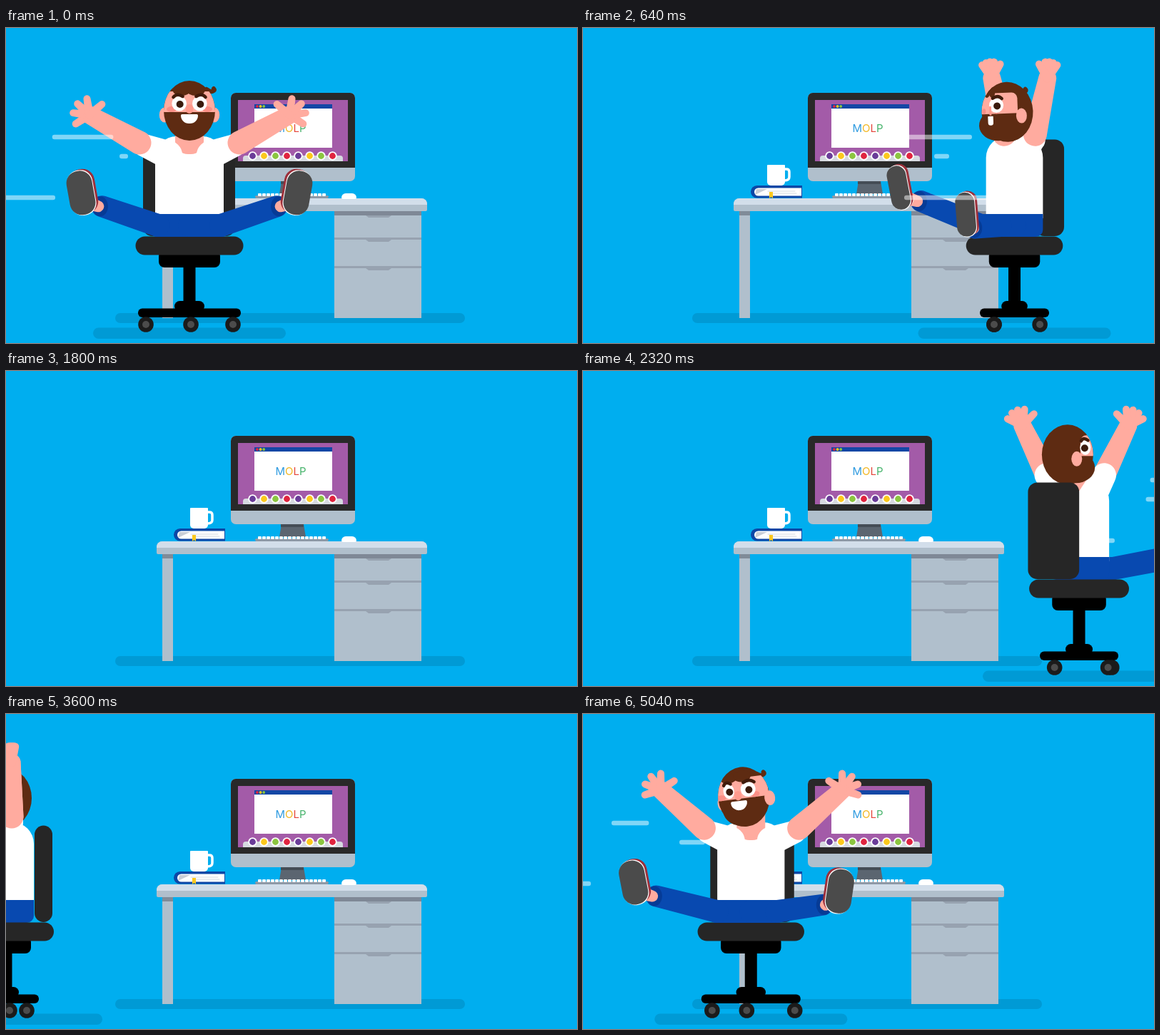
Write an HTML page with a canvas that moves like this. It is 800x442 px and loops after 5.08 s.

```html
<!DOCTYPE html>
<html lang="en">
<head>
<meta charset="utf-8">
<title>Office chair spin</title>
<style>
html, body { margin: 0; width: 100%; height: 100%; overflow: hidden; background: #00aeef; }
canvas { display: block; }
</style>
</head>
<body>
<canvas id="stage" width="800" height="442"></canvas>
<script>
const ctx = document.getElementById('stage').getContext('2d');
const LOOP = 5080, STEP = 40, RAD = Math.PI / 180;
const SKIN = '#ffab9f', HAIR = '#5e2b12', JEANS = '#0849b0', CUFF = '#063b96', CHAIR = '#262626',
      RED = '#9c303b', SHADOW = 'rgba(0,40,60,.15)', STEEL = '#b0bfcc', LINE = '#97a2b0',
      PURPLE = '#6a3c98', YELLOW = '#fbc81d', GREEN = '#8bc540', CRIMSON = '#e0243f';

function box(x, y, w, h, r, color) {
  ctx.fillStyle = color;
  ctx.beginPath();
  ctx.roundRect(x, y, w, h, r);
  ctx.fill();
}
function disc(x, y, rx, color, ry = rx) {
  ctx.fillStyle = color;
  ctx.beginPath();
  ctx.ellipse(x, y, rx, ry, 0, 0, 7);
  ctx.fill();
}
function shape(color, ...points) {
  ctx.fillStyle = color;
  ctx.beginPath();
  points.forEach(p => ctx.lineTo(...p));
  ctx.fill();
}
function line(color, width, path) {
  ctx.strokeStyle = color;
  ctx.lineWidth = width;
  ctx.lineCap = ctx.lineJoin = 'round';
  ctx.stroke(new Path2D(path));
}
// Tapered capsule between two circles
function limb(x1, y1, r1, x2, y2, r2, color) {
  const a = Math.atan2(y2 - y1, x2 - x1), q = Math.PI / 2;
  ctx.fillStyle = color;
  ctx.beginPath();
  ctx.arc(x1, y1, r1, a + q, a - q);
  ctx.arc(x2, y2, r2, a - q, a + q);
  ctx.fill();
}

function drawDesk() {
  box(153, 400, 490, 14, 7, SHADOW);
  box(219, 257, 15, 150, 0, STEEL);
  box(219, 257, 15, 6, 0, '#808b98');
  box(460, 257, 122, 150, 0, STEEL);
  box(460, 257, 122, 6, 0, '#7f8896');
  for (const y of [263, 297, 337]) {
    if (y > 263) box(460, y - 3, 122, 3, 0, LINE);
    shape(LINE, [504, y], [540, y], [536, y + 3], [508, y + 3]);
  }
  box(211, 239, 379, 18, [8, 8, 2, 2], STEEL);
  box(211, 239, 379, 9, [8, 8, 0, 0], '#d2deea');

  shape('#5b6570', [386, 215], [417, 215], [420, 233], [383, 233]);
  box(385, 215, 32, 4, 0, '#454d56');
  box(315, 91, 174, 124, 7, STEEL);
  box(315, 91, 174, 105, [7, 7, 0, 0], '#292929');
  box(325, 101, 154, 86, 0, '#a35ba8');
  box(348, 107, 109, 61, 0, '#fff');
  box(348, 107, 109, 6, 0, '#1347a5');
  [CRIMSON, YELLOW, GREEN].forEach((c, i) => disc(352 + i * 4.6, 110, 1.9, c));
  drawTitle();
  box(332, 179, 140, 8, [4, 4, 0, 0], '#d6dae0');
  for (let i = 0; i < 8; i++) {
    disc(345.5 + i * 16, 179.5, 6.2, '#fff');
    disc(345.5 + i * 16, 179.5, 4.4, [PURPLE, YELLOW, GREEN, CRIMSON][i % 4]);
  }

  box(349, 235, 103, 4, 2, '#8e99a6');
  for (let x = 353; x < 447; x += 6) box(x, 232, 5, 4, 1, '#fff');
  box(470, 232, 21, 8, [9, 9, 3, 3], '#fff');

  box(235, 221, 72, 17.5, [9, 0, 0, 9], '#0c47a6');
  box(240, 224.5, 66, 11, [6, 0, 0, 6], '#fff');
  shape('#c9ced6', [241, 234], [258, 226], [243, 226]);
  line('#d3d9e0', 1, 'M259 229H297M266 232H299');
  shape(YELLOW, [261, 230], [266, 230], [266, 239], [263.5, 237], [261, 239]);
  line('#fff', 3.5, 'M281 198h4q4 0 4 4v7q0 5-7 5');
  box(258, 192, 25, 29, [1, 1, 5, 5], '#fff');
}

function drawTitle() {
  ctx.font = '15px Inter, sans-serif';
  let x = 399 - ctx.measureText('MOLP').width / 2;
  [...'MOLP'].forEach((letter, i) => {
    ctx.fillStyle = ['#2f9be0', '#f2b61f', '#e5483f', '#45b36b'][i];
    ctx.fillText(letter, x, 146);
    x += ctx.measureText(letter).width;
  });
}

// Everything below is drawn around x = 0, the axis of the chair.
function drawChairBase(sin, cos, e) {
  const mix = (front, side) => front + (side - front) * e;
  const seat = mix(75.5, 67), plate = mix(43, 35), foot = mix(72, 46), wheel = mix(61, 29);
  box(-8.5, 330, 17, 66, 0, '#000');
  box(-plate, 312, 2 * plate, 24, 8, '#000');
  box(-seat, 292.5, 2 * seat, 26, 13, CHAIR);
  const hub = mix(21, 18);
  box(-hub, 383, 2 * hub, 15, 8, '#000');
  box(-foot, 393.5, 2 * foot, 12.5, 6, '#000');
  const shift = -12 * sin * cos;
  const middle = Math.max(shift - wheel, sin < 0 ? -62 * e : 2 - 7 * sin - 16 * sin * Math.abs(cos));
  for (const x of [shift - wheel, middle, shift + wheel]) {
    disc(x, 416, 10.8, '#1b1b1b');
    disc(x, 416, 5, '#4c4c4c');
  }
}

function drawChairBack(sin, e) {
  const dir = sin < 0 ? -1 : 1;
  const outer = -dir * (65 - 8 * Math.sin(2 * Math.PI * e)), inner = dir * (64 - 104 * e ** 1.15);
  box(Math.min(outer, inner), 156.5, Math.abs(inner - outer), 135.5, 13, CHAIR);
}

function drawFoot(x, y, front, cos) {
  const side = Math.sign(x) || 1, w = front ? 12 + 24 * Math.min(1, Math.abs(cos) * 2) : 36;
  ctx.save();
  ctx.translate(x, y);
  ctx.rotate((front ? x / 15 : side * 20) * RAD);
  if (front) {
    box(-w / 2 - side * 4, -33, w, 63, 17, RED);
    box(-w / 2 - side, -32, w, 64, 17, '#fff');
    box(-w / 2, -31, w, 62, 17, '#4b4b4b');
  } else {
    box(-17, -32, 34, 64, 17, RED);
    line('#fff', 1.2, `M${side * 11} -18Q${side * 12} 8 ${side * 9} 27`);
  }
  ctx.restore();
}

function drawLeg({ x, y, z }, cos) {
  const front = cos > 0;
  const cuffX = x * (front ? .84 : .89), cuffY = y + (front ? 19 : 16 - .07 * z), kneeX = x * .29;
  if (!front) drawFoot(x, y, false, cos);
  limb(0, 277, 16, kneeX, 277, 16, JEANS);
  limb(kneeX, 277, 16, front ? cuffX * .96 : cuffX, cuffY, front ? 15 : 16.5, JEANS);
  if (front) {
    disc(cuffX * .98, cuffY, 11, CUFF, 14);
    limb(cuffX, cuffY, 8, x * .9, y + 16, 9, SKIN);
    limb(x * .93, y + 16, 10, x * .96, y + 15, 10, '#fff');
    drawFoot(x, y, true, cos);
  }
}

function drawArm(side, sin, cos) {
  const front = cos > 0, bump = Math.max(0, cos) ** 12, shift = -8 * sin * sin * Math.sign(sin);
  const baseX = side * (front ? 70 : 62) * cos + shift, baseY = 144 + 17 * Math.abs(cos);
  const handX = side * (126 * cos + 14 * bump) + shift, handY = 68 + 25 * cos * cos + 29 * bump;
  const aim = Math.atan2(handY - baseY, handX - baseX);
  const spread = Math.sign(handX - shift) * (.12 + .88 * Math.abs(cos));
  const sleeve = (along, r) => limb(side * 30 * cos, 178, 20,
    baseX + (handX - baseX) * along, baseY + (handY - baseY) * along, r, '#fff');
  if (front) sleeve(-.1, 16);
  limb(baseX, baseY, 16.5, handX, handY, 12.5, SKIN);
  for (const deg of [-62, -22, 14, 52, 110]) {
    const a = aim - deg * spread * RAD;
    limb(handX, handY, 6, handX + 23 * Math.cos(a), handY + 23 * Math.sin(a), 5, SKIN);
  }
  if (!front) sleeve(.1, 17);
}

function drawTorso(e) {
  const half = 48 - 9 * e;
  box(-half, 152, 2 * half, 115, [30, 30, 0, 0], '#fff');
  box(-half, 261, 2 * half, 32, [0, 0, 10, 10], JEANS);
}

function drawHead(deg, sin, cos) {
  const at = (r, offset) => r * Math.sin((deg + offset) * RAD);
  const facing = offset => Math.cos((deg + offset) * RAD);
  const ear = offset => disc(at(36, offset), 6, 7.5, SKIN, 10.5);
  const sway = Math.sin(2 * deg * RAD);
  ctx.save();
  ctx.translate(17 * sway, 118 - 2 * cos * cos);
  ctx.rotate(13 * sway * Math.max(0, cos) * RAD);
  [-105, 105].forEach(o => facing(o) <= 0 && facing(o) > -.6 && ear(o));
  if (cos > .3) line(HAIR, 6, `M${24 + 8 * sin} -30q7 5 10 2q2-1 0-3`);
  disc(14 * sin, 18, 27, HAIR, 22);

  ctx.save();
  ctx.beginPath();
  ctx.ellipse(0, 0, 36, 42, 0, 0, 7);
  ctx.clip();
  box(-40, -45, 80, 90, 0, HAIR);
  const lo = Math.max(deg - 96, -90), hi = Math.min(deg + 96, 90);
  if (lo < hi) {
    const left = lo <= -90 ? -38 : 36 * Math.sin(lo * RAD);
    const right = hi >= 90 ? 38 : 36 * Math.sin(hi * RAD);
    box(left, -27, right - left, 29, [8, 8, 0, 0], SKIN);
  }
  if (cos > -.1) {
    const x = 25 * sin, squash = Math.max(.35, cos);
    disc(x - 11 * squash, -28, 12 * squash, HAIR, 7);
    disc(x + 9 * squash, -29, 13 * squash, HAIR, 8);
    disc(x - 25 * squash, -2, 7 * squash, '#f98f86', 4);
    disc(x + 25 * squash, -2, 7 * squash, '#f98f86', 4);
  }
  for (const o of [-35, 35]) {
    if (facing(o) < -.05) continue;
    const x = at(25, o), k = Math.max(.6, facing(o)), s = Math.sign(o);
    disc(x, -10, 10.5 * Math.min(1, k * 1.2), '#fff', 10.5);
    disc(x + 1, -9, 5, '#3a1a0c');
    line('#401b0b', 4.5, `M${x - s * 6 * k} -20Q${x + s * 3} -25 ${x + s * 10 * k} -19`);
  }
  if (cos > .05) {
    const x = 25 * sin;
    box(x - 5 * cos, -9, 10 * cos, 13, 5, '#ff9a8d');
    box(x - 12 * cos, 5, 24 * cos, 13, [2, 2, 12, 12], '#fff');
  }
  ctx.restore();
  [-105, 105].forEach(o => facing(o) > 0 && ear(o));
  ctx.restore();
}

function drawRider(u) {
  const deg = ((u * .45 + 180) % 360 + 360) % 360 - 180;
  const sin = Math.sin(deg * RAD), cos = Math.cos(deg * RAD), e = sin * sin;
  const front = cos > .001, bump = Math.max(0, cos) ** 30;
  const reach = 64 + 70 * e * e;
  const legs = [-152, 152].map(a => {
    const z = reach * cos - a * sin;
    return { x: a * cos + reach * sin, y: 238 + .13 * z - 15 * bump, z };
  }).sort((a, b) => a.z - b.z);
  const arms = () => [-1, 1].forEach(side => drawArm(side, sin, cos));

  box(-135, 420.5, 270, 15.5, 8, SHADOW);
  if (front) {
    drawChairBack(sin, e);
    drawChairBase(sin, cos, e);
    drawTorso(e);
    box(-20, 140, 40, 37, [0, 0, 18, 18], SKIN);
    legs.forEach(leg => drawLeg(leg, cos));
    arms();
    drawHead(deg, sin, cos);
  } else {
    legs.forEach(leg => drawLeg(leg, cos));
    drawTorso(e);
    limb(8 * Math.sin(2 * deg * RAD), 140, 19, 0, 155, 19, SKIN);
    if (e < .99) {
      arms();
      drawHead(deg, sin, cos);
    } else {
      drawHead(deg, sin, cos);
      arms();
    }
    drawChairBase(sin, cos, e);
    drawChairBack(sin, e);
  }
}

// y, resting x, time the head rests, time the tail catches up, tail speed
const STREAKS = [
  [153, 20, -270, -100, .62], [153, 278, 88, 344, .62], [153, 545, 570, 840, .62],
  [180, 171, -170, 20, .6], [180, 389, 320, 416, .6], [180, 600, 700, 820, .6],
  [238, 66, -330, -260, .55], [238, 404, 231, 330, 1.35], [238, 660, 700, 850, 1]
];
function drawStreaks(u) {
  for (const [y, x, rest, end, speed] of STREAKS) {
    const head = x - 1.45 * Math.max(0, rest - u), tail = x - speed * (end - u);
    if (head > tail) box(tail, y - 3.2, head - tail, 6.4, 3.2, 'rgba(255,255,255,.5)');
  }
}

function draw(t) {
  ctx.fillStyle = '#00aeef';
  ctx.fillRect(0, 0, 800, 442);
  drawDesk();
  // The way back is the mirrored ride, 2600 ms later.
  const back = t > 1600 && t < 4100;
  const u = t <= 1600 ? t : back ? t - 2600 : t - LOOP;
  ctx.save();
  if (back) {
    ctx.translate(800, 0);
    ctx.scale(-1, 1);
  }
  ctx.save();
  ctx.translate(257 + .543 * u, 0);
  drawRider(u);
  ctx.restore();
  drawStreaks(u);
  ctx.restore();
}

const start = performance.now();
function tick() {
  const t = (performance.now() - start) % LOOP;
  draw(Math.floor(t / STEP) * STEP);
  requestAnimationFrame(tick);
}
tick();
</script>
</body>
</html>
```
